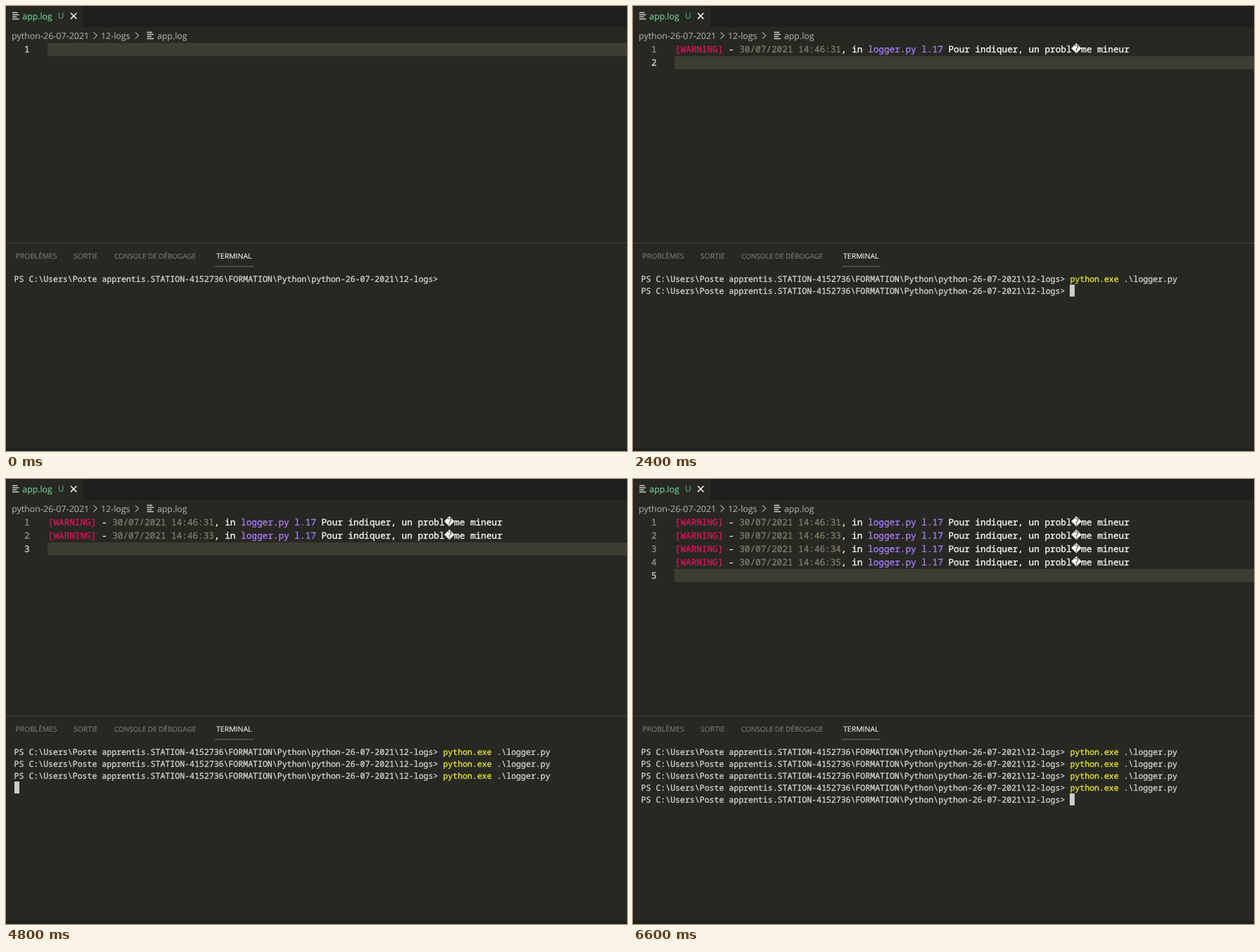
Animation, 883 px wide and 634 px high, one loop 7600 ms. Source, as an HTML page:

```html
<!DOCTYPE html>
<html lang="fr">
<head>
<meta charset="utf-8">
<title>Terminal et journal</title>
<style>
  html, body { margin: 0; width: 100%; height: 100%; overflow: hidden; background: #272822; }
  svg { display: block; width: 883px; height: 634px; }
  text { text-rendering: geometricPrecision; }
  .ui { font-family: "Open Sans", "Noto Sans", sans-serif; stroke-width: 0.12px; }
  .mono { font-family: "Noto Sans Mono", "DejaVu Sans Mono", monospace; stroke-width: 0.35px; }
  .symbol { font-family: "DejaVu Sans", sans-serif; stroke-width: 0.3px; }
</style>
</head>
<body>
<svg id="stage" viewBox="0 0 883 634"></svg>
<script>
const stage = document.getElementById("stage");
const LOOP = 7600;
const PROMPT = "PS C:\\Users\\Poste apprentis.STATION-4152736\\FORMATION\\Python\\python-26-07-2021\\12-logs>";
const EDITOR = { x: 59.8, top: 52.7, pitch: 18.85, size: 12.7, char: 7.62 };
const TERM = { x: 11.6, top: 380.6, pitch: 16.85, size: 11.55, char: 6.93 };

// time, log lines, prompts, commands, cursor column
const STEPS = [
  [0, 0, 1, 0, null],
  [200, 0, 1, 1, 110],
  [2200, 0, 1, 1, 0],
  [2400, 1, 2, 1, 88],
  [3000, 1, 2, 2, 110],
  [3800, 1, 3, 2, 88],
  [4000, 2, 3, 2, 88],
  [4400, 2, 3, 3, 110],
  [4800, 2, 3, 3, 0],
  [5000, 3, 4, 3, 88],
  [5400, 3, 4, 4, 110],
  [6200, 3, 4, 4, 0],
  [6400, 4, 5, 4, 88]
];

function add(name, attrs, parent = stage) {
  const el = document.createElementNS("http://www.w3.org/2000/svg", name);
  for (const key in attrs) el.setAttribute(key, attrs[key]);
  parent.appendChild(el);
  return el;
}

function rect(x, y, width, height, fill) {
  return add("rect", { x, y, width, height, fill });
}

// the thin stroke gives the text its slightly heavy screen weight
function label(str, x, y, size, fill, parent = stage, kind = "ui") {
  const el = add("text", { x, y, "font-size": size, fill, stroke: fill, class: kind }, parent);
  el.textContent = str;
  return el;
}

function line(d, stroke, width) {
  add("path", { d, stroke, "stroke-width": width, fill: "none" });
}

function fileIcon(x, y) {
  line(`M${x} ${y}h7.5m-7.5 3h9.5m-9.5 3h6.5m-6.5 3h9.5`, "#cdcdc8", 1.3);
}

function drawFrame() {
  rect(0, 0, 883, 634, "#272822");
  rect(110, 0, 773, 30, "#1e1f1c");
  fileIcon(9, 9.5);
  label("app.log", 23.3, 18.7, 12.3, "#73d39a");
  label("U", 74, 18.3, 11.8, "#5fa679");
  line("M92 10l8.4 8.4m0 -8.4l-8.4 8.4", "#f4f4ee", 1.5);

  const crumb = "#a9aaa5";
  label("python-26-07-2021", 8, 46.5, 12.5, crumb);
  label("12-logs", 135, 46.5, 12.4, crumb);
  label("app.log", 215, 46.5, 12.3, crumb);
  line("M124.5 37.3l4.8 4.8l-4.8 4.8M183.8 37.3l4.8 4.8l-4.8 4.8", crumb, 1.1);
  fileIcon(200.5, 37.5);

  rect(0, 337, 883, 1, "#414339");
  const dim = "#7c7d77";
  label("PROBLÈMES", 13.6, 359.7, 10.3, dim);
  label("SORTIE", 96, 359.7, 10.4, dim);
  label("CONSOLE DE DÉBOGAGE", 154, 359.7, 9.95, dim);
  label("TERMINAL", 299, 359.7, 10.5, "#f8f8f2");
  rect(297, 370.5, 55, 1, "#75715e");
  rect(0, 630, 883, 4, "#1f1f1e");
}

function logLine(i, second) {
  const g = add("g", {});
  const y = EDITOR.top + i * EDITOR.pitch + 13.7;
  const put = (str, col, fill, shift = 0) =>
    label(str, EDITOR.x + col * EDITOR.char + shift, y, EDITOR.size, fill, g, "mono");
  const white = "#f8f8f2", gray = "#7f7b68", purple = "#a87bf8";
  put("[WARNING]", 0, "#d6145c");
  put("-", 10, white);
  put("30/07/2021", 12, gray);
  put("14:46:" + second, 23, gray);
  put(", in", 31, white);
  put("logger.py", 36, purple);
  put("l.17", 46, purple);
  put("Pour indiquer, un probl", 51, white);
  label("\uFFFD", 623.2, y, 14, white, g, "symbol");
  put("me mineur", 75, white, 6);
  return g;
}

function termText(row, col, str, fill) {
  const y = TERM.top + row * TERM.pitch + 12.6;
  return label(str, TERM.x + col * TERM.char, y, TERM.size, fill, stage, "mono");
}

drawFrame();
const highlight = rect(59, EDITOR.top, 824, 18.6, "#3e3d32");
const numbers = [1, 2, 3, 4, 5].map((n, i) =>
  label(n, 26, EDITOR.top + i * EDITOR.pitch + 13.7, EDITOR.size, "#90908a", stage, "mono"));
const logs = [31, 33, 34, 35].map((second, i) => logLine(i, second));
const prompts = numbers.map((_, row) => termText(row, 0, PROMPT, "#d0d0cd"));
const commands = logs.map((_, row) => [
  termText(row, 88, "python.exe", "#e2e22e"),
  termText(row, 99, ".\\logger.py", "#d0d0cd")
]);
const cursor = rect(0, 0, 7, 17, "#cccccc");

function show(el, on) {
  el.setAttribute("visibility", on ? "visible" : "hidden");
}

function render(time) {
  const t = time % LOOP;
  const [, logCount, promptCount, commandCount, col] = STEPS.findLast(step => step[0] <= t);
  highlight.setAttribute("y", EDITOR.top + logCount * EDITOR.pitch);
  numbers.forEach((el, i) => {
    const color = i === logCount ? "#d0d0ca" : "#90908a";
    show(el, i <= logCount);
    el.setAttribute("fill", color);
    el.setAttribute("stroke", color);
  });
  logs.forEach((el, i) => show(el, i < logCount));
  prompts.forEach((el, i) => show(el, i < promptCount));
  commands.forEach((pair, i) => pair.forEach(el => show(el, i < commandCount)));

  show(cursor, col !== null);
  // a running command leaves the cursor at the start of the next row
  const row = col === 0 ? promptCount : promptCount - 1;
  cursor.setAttribute("x", Math.round(TERM.x + col * TERM.char));
  cursor.setAttribute("y", Math.floor(TERM.top + row * TERM.pitch));
}

function tick() {
  render(performance.now());
  requestAnimationFrame(tick);
}
tick();
</script>
</body>
</html>
```
